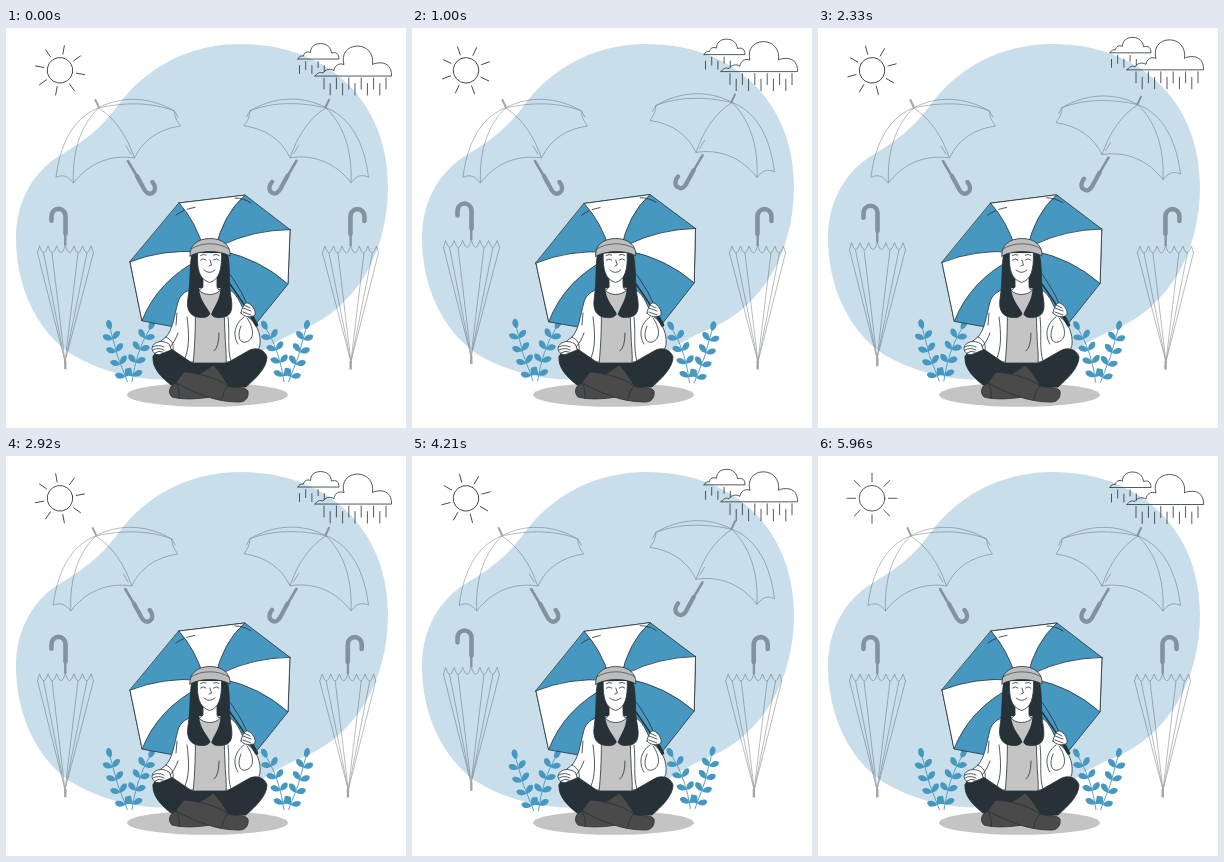
An HTML page for the animation above (6000 ms loop, 400 by 400 pixels).

```html
<!DOCTYPE html>
<html lang="en">
<head>
<meta charset="utf-8">
<title>Waiting under an umbrella</title>
<style>
  html, body { margin: 0; width: 100%; height: 100%; overflow: hidden; background: #fff; }
  svg { display: block; width: 100vw; height: 100vh; }
  .line { fill: none; stroke: #263238; stroke-width: .8; stroke-linecap: round; stroke-linejoin: round; }
  .ghost { opacity: .43; }
  .ghost .line { stroke-width: .75; }
  .blue { fill: #4698c0; }
  .white { fill: #fff; }
  .dark { fill: #263238; }
  .gray { fill: #c4c4c4; }
  .shoe { fill: #4a4a4a; }
  .edge { stroke: #263238; stroke-width: .8; stroke-linejoin: round; stroke-linecap: round; }
</style>
</head>
<body>
<svg viewBox="0 0 400 400">
  <defs>
    <g id="open" class="ghost">
      <g class="line">
        <path d="M92.5 80C73 87 55 108 50 149.500C57 146 62 148 67.500 155C82 136 104 126 128.500 130C137 112 153 101 174.500 98C172 94 169 91 168.500 83C145 69 116 67 92.500 80Z"/>
        <path d="M92.500 80C76 96 66 121 67.500 155M92.500 80C109 90 121 108 128.500 130M92.500 80C119 74 146 74 168.500 83"/>
        <path d="M168.500 83L172 89M120 118L125 126"/>
      </g>
      <path class="line" style="stroke-width:2" d="M89.500 72L93 79.500"/>
      <path class="line" style="stroke-width:2.600" d="M122 133L132 150"/>
      <path class="line" style="stroke-width:4.300" d="M131 148L137 159C140 166 144 167 147 164.500C150.500 162 149 157 146.500 154"/>
    </g>
    <g id="closed" class="ghost">
      <g class="line">
        <path id="rim"/>
        <path d="M31.500 225L59 334L87.500 225M37.500 225L59 334M46 225L59 334M72 225L59 334M81 225L59 334"/>
      </g>
      <path class="line" style="stroke-width:2.400;stroke-linecap:butt" d="M59.300 206V218M59.300 333V341.500"/>
      <path class="line" style="stroke-width:4.600" d="M59.500 206V189C59.500 178.500 45.500 178.500 45.500 189V193"/>
    </g>
    <g id="plant"></g>
  </defs>

  <path fill="#c8dfeb" d="M10 210C10 176 25 147 50 130C78 113 94 102 113 76C140 40 182 16 235 16C320 16 382 72 382 158C382 225 350 278 300 300C268 312 250 330 222 341C170 359 112 354 65 326C30 302 10 258 10 210Z"/>

  <g id="sun" class="line"><circle cx="54" cy="42.300" r="12.800"/></g>

  <g id="clouds" class="line">
    <path d="M292 31.500H333C333 26 330 24 325.500 25.500C325 20 321 16 314.500 16C308 16 304.500 20 304.500 25C301 23.500 298 25 297.500 28.500C295 28 293 29 292 31.500"/>
    <path d="M309 48.500H385.500C386 39 380 34 371 35.500C370 35.500 368 36 366.500 37C368 26 361 18.500 351.500 18.500C341 18.500 335 27 338 37C333 35 328.500 38 328 43C324 40.500 319 42 317 45.500C314 44 311 45.500 309 48.500"/>
    <path id="rain"/>
  </g>

  <g id="openLeft"><use href="#open"/></g>
  <g id="openRight"><use href="#open" transform="translate(412.500 0) scale(-1 1)"/></g>
  <g id="closedLeft"><use href="#closed"/></g>
  <g id="closedRight"><use href="#closed" transform="translate(404 0) scale(-1 1)"/></g>

  <ellipse cx="201.500" cy="366.800" rx="80.500" ry="12" class="gray"/>

  <g id="plants">
    <use href="#plant"/>
    <use href="#plant" transform="translate(404 0) scale(-1 1)"/>
  </g>

  <g id="canopy">
    <path class="blue edge" d="M173 175L239 167L284 201.500L282 256L249 297L190 303L136 293L124 234Z"/>
    <g class="white edge">
      <path d="M173 175L239 167Q217 186 209 222H198Q190 194 173 175Z"/>
      <path d="M284 201.500L282 256Q254 231 216 223V217Q247 202 284 201.500Z"/>
      <path d="M124 234L136 293Q152 252 196 230L195 224Q157 221 124 234Z"/>
    </g>
    <path class="line" d="M249 297Q239 263 216 236"/>
    <path class="line" d="M170 187Q174 184 178 182.500M181 181.300L189 179.300M229 170Q238 170 245 175"/>
  </g>

  <g>
    <!-- jacket and shirt -->
    <path class="white edge" d="M188 261C180 262 174 267 172 274C168 289 167 301 160 309C155 313 148 317 149 324C154 332 171 334 188 334H222C237 334 252 327 254 317C255 306 251 295 241 288C236 281 233 267 224 262Z"/>
    <path class="gray edge" d="M193 261C196 268 210 268 215 261C219 276 218 292 219 305C219 317 221 326 220 336H187C189 318 190 291 189 272Z"/>
    <path class="line" d="M181 289C183 304 184 321 178 332M172 305C168 316 163 321 157 325M213 305Q213 319 208 323M222 289C224 305 221 321 225 333M238 289C229 295 226 307 232 316M241 290C247 298 250 311 240 314C233 316 231 307 235 298M171 285L170 297M160 309C166 312 168 316 167 323"/>

    <!-- shaft and hand -->
    <path class="line" style="stroke-width:1.400" d="M224 256L246 288"/>
    <path class="line" style="stroke-width:3.600" d="M244.500 286L250.500 297"/>
    <path class="white edge" d="M235 285C236 279 239 274 242 275C246 277 250 282 249 287C245 290 238 289 235 285Z"/>
    <path class="line" d="M238 277L244 280M237 280L245 283M237 284L245 287"/>

    <!-- legs -->
    <path class="dark edge" d="M147 329C150 321 158 318 167 322L186 335H221L242 323C250 318 259 322 261 329C261 340 249 351 240 359L202 360L165 357C155 349 146 340 147 329Z"/>
    <path class="shoe edge" d="M207 337C213 342 216 348 222 357L204 369C194 371 176 372 166 369C161 364 164 357 170 355C182 352 196 346 207 337Z"/>
    <path class="shoe edge" d="M178 344C191 345 210 349 222 358C230 361 239 358 242 363C243 369 240 375 231 374C210 374 189 365 170 355Z"/>
    <path class="line" d="M222 358Q217 363 216 371M170 355Q174 361 173 370"/>

    <!-- resting hand -->
    <path class="white edge" d="M163 316C156 311 147 314 146 320C146 325 151 328 155 326L165 322Z"/>
    <path class="line" d="M147 319Q152 316 158 319M147 322Q152 319 158 322M149 325Q153 322 157 324"/>
  </g>

  <g id="head">
    <path class="dark edge" d="M186 224C183 240 185 253 182 270C180 282 184 289 195 289.500C200 290 204 288 204.500 284C206 289 210 290 215 289.500C224 289 227 284 225.500 272C222 254 225 239 221 224Z"/>
    <path class="gray" d="M193 260H214.500C214 273 208 278 205 287C201 278 194 273 193 260Z"/>
    <path class="white edge" d="M197 248V259C195 261 194 262 193 262C198 268 209 268 214.500 262C212 262 211 260 211 258V248Z"/>
    <path class="white edge" d="M191.500 225C191 242 193 251 203.500 254.500C213 252 216 242 215.500 225Z"/>
    <path class="line" d="M194.500 232Q197.500 229.500 200 232M207.500 232Q210.500 229.500 213 232M194.500 227.500Q197.500 225.500 200 227M207.500 227Q211 225.500 213 227.500M204 232L205.500 237L203 238M198 242Q203.500 247 209 242"/>
    <path fill="#bdbdbd" class="edge" d="M184 228C183 218 191 210.500 204 210.500C217 210.500 225 218 224 228C214 222 194 222 184 228Z"/>
    <path class="line" d="M185 221C195 214 213 214 223 221" style="stroke-width:.600"/>
  </g>
</svg>

<script>
const LOOP = 6000, STEP = 125 / 3;
const $ = id => document.getElementById(id);

function add(parent, tag, attrs) {
  const el = document.createElementNS('http://www.w3.org/2000/svg', tag);
  for (const key in attrs) el.setAttribute(key, attrs[key]);
  parent.appendChild(el);
}

// Sun rays
for (let a = 0; a < 360; a += 45)
  add($('sun'), 'path', { d: 'M70.5 42.300H79', transform: `rotate(${a} 54 42.3)` });

// Rain under both clouds
let rain = '';
for (let i = 0; i < 11; i++)
  rain += `M${318 + i * 6.2} ${i % 2 ? 56 : 50.5}v${i % 2 ? 11.5 : 11}`;
for (let i = 0; i < 5; i++)
  rain += `M${293.5 + i * 6.2} ${i % 2 ? 34 : 38}v${i > 2 ? 6 : 8}`;
$('rain').setAttribute('d', rain);

// Scalloped rim of the closed umbrella
$('rim').setAttribute('d', 'M31.5 225L33.500 218' + 'q4.300 14 8.600 0'.repeat(6) + 'L87.500 225');

// A stem with leaf pairs along a quadratic curve
function stem(a, b, c) {
  const plant = $('plant');
  add(plant, 'path', {
    d: `M${a}Q${b} ${c}`, fill: 'none', stroke: '#4698c0', 'stroke-width': .9
  });
  const leaf = (x, y, angle) => add(plant, 'path', {
    class: 'blue',
    d: 'M0 0C3 -4 9 -4.500 10.500 0C9 3.500 3 3.500 0 0Z',
    transform: `translate(${x} ${y}) rotate(${angle})`
  });
  for (let i = 0; i < 5; i++) {
    const t = i < 4 ? .1 + i * .24 : 1, u = 1 - t;
    const [x, y] = [0, 1].map(k => u * u * a[k] + 2 * u * t * b[k] + t * t * c[k]);
    const [dx, dy] = [0, 1].map(k => u * (b[k] - a[k]) + t * (c[k] - b[k]));
    const angle = Math.atan2(dy, dx) * 180 / Math.PI;
    if (t === 1) leaf(x, y, angle);
    else for (const side of [-1, 1]) leaf(x, y, angle + side * 55);
  }
}
stem([121.5, 354], [110, 328], [104.5, 302]);
stem([126, 354], [130, 324], [143, 302]);

// Motion tables: [phase, value], linear in between
const SHAKE = [[0, 0], [.1, -1], [.2, 2], [.3, -4], [.4, 4], [.5, -4],
               [.6, 4], [.7, -4], [.8, 2], [.9, -1], [1, 0]];
const FLOAT = [[0, 0], [.5, -8], [1, 0]];
const WIND = [[0, 0], [.25, 1], [.75, -1], [1, 0]];
const SPIN = [[0, 0], [1, 360]];

function sample(table, p) {
  const i = Math.max(1, table.findIndex(k => k[0] >= p));
  const [p0, v0] = table[i - 1], [p1, v1] = table[i];
  return v0 + (v1 - v0) * (p - p0) / (p1 - p0);
}

const moveX = v => `translate(${v * .8} 0)`;
const moveY = v => `translate(0 ${v})`;
const turn = (x, y) => v => `rotate(${v} ${x} ${y})`;

const parts = [
  ['sun', SPIN, 1500, turn(54, 42.3)],
  ['clouds', FLOAT, 1500, moveY],
  ['openLeft', SHAKE, 6000, moveX],
  ['openRight', FLOAT, 3000, moveY],
  ['closedLeft', FLOAT, 3000, moveY],
  ['closedRight', SHAKE, 6000, moveX],
  ['plants', WIND, 6000, turn(202, 323)],
  ['canopy', WIND, 1500, turn(204, 240)],
  ['head', WIND, 1500, turn(204, 250)]
].map(([id, ...rest]) => [$(id), ...rest]);

function draw(ms) {
  // 24 poses per second, the first one a step into the cycle
  const t = (Math.floor((ms % LOOP + 3.5) / STEP) + 1) * STEP;
  for (const [el, table, period, form] of parts)
    el.setAttribute('transform', form(sample(table, t % period / period)));
}

const start = performance.now();
function tick() {
  draw(performance.now() - start);
  requestAnimationFrame(tick);
}
draw(0);
requestAnimationFrame(tick);
</script>
</body>
</html>
```
